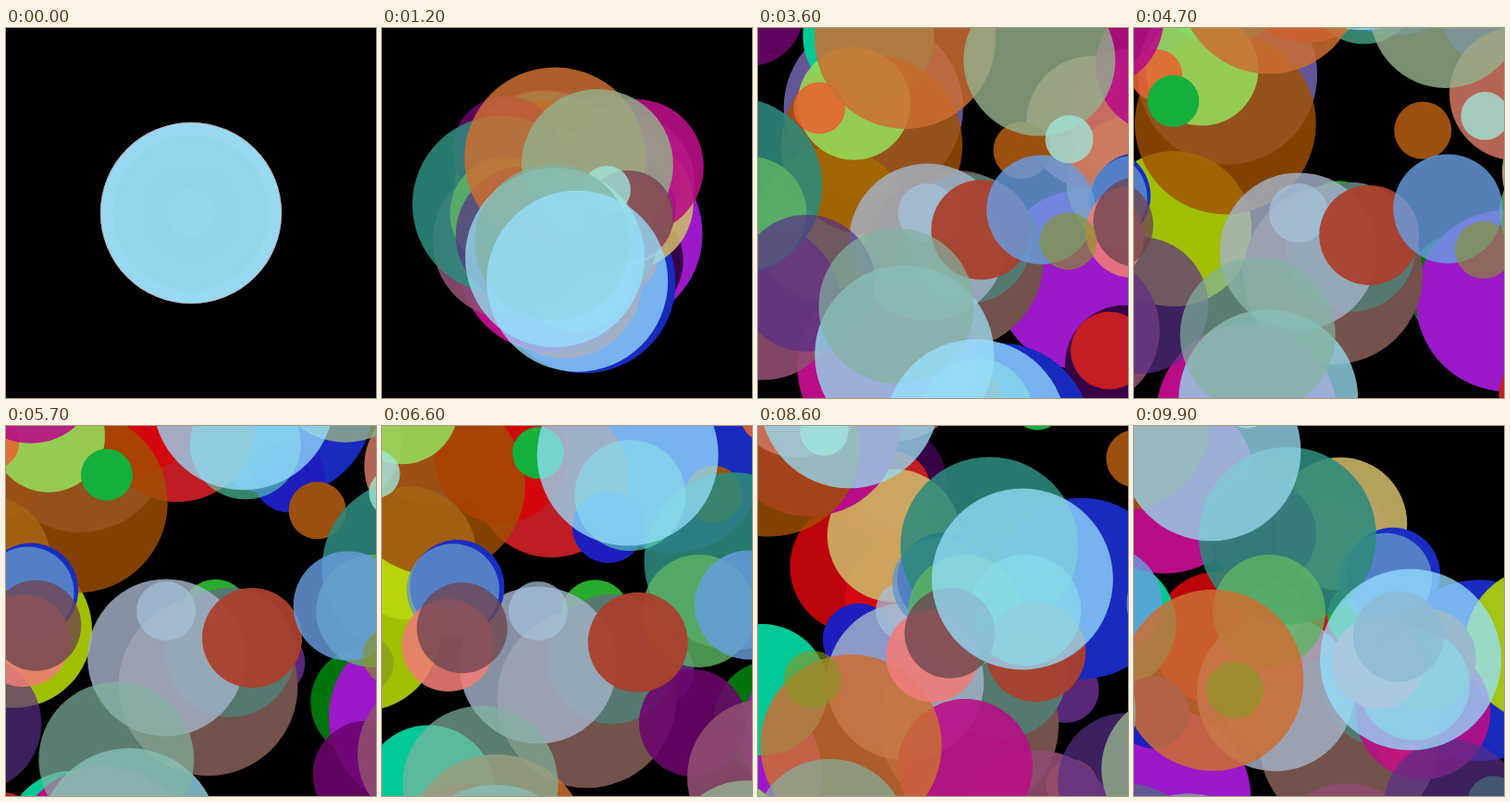
An HTML page with a canvas that plays this animation: 400 px wide and 400 px high, repeating every 10000 ms.

```html
<!DOCTYPE html>
<html lang="en">
<head>
<meta charset="utf-8">
<title>Drifting discs</title>
<style>
  html, body { margin: 0; width: 100%; height: 100%; overflow: hidden; background: #000; }
  canvas { display: block; width: 100vmin; height: 100vmin; }
</style>
</head>
<body>
<canvas id="stage" width="400" height="400"></canvas>
<script>
const ctx = document.getElementById('stage').getContext('2d');
const SIZE = 400, MID = 200;
const STEP = 100, STEPS = 100;
const PAD = 4; // how far beyond the edge a disc goes before it re-enters

// Each disc: radius, velocity x, velocity y (pixels per step), colour.
const back = [
  [36, 1.56, 1, '#5a2878'],
  [60, 3.38, 1.76, '#00730f'],
  [98, 4.41, 2.06, '#9b19c8'],
  [64, 5.6, 4.68, '#370046'],
  [98, 1.76, 6.82, '#192abe'],
  [97, -2.15, -3.25, '#645596'],
  [84, -0.26, 6.68, '#be1e23'],
  [73, 5.92, -3.02, '#8c4b6e'],
  [72, -1.1, 5.93, '#d7050ce0'],
  [42, 5.14, 4.25, '#c31e23'],
  [71, -2.3, -5.47, '#00c896'],
  [72, 5.87, -0.96, '#cdb969e0'],
  [84, -3.41, 0.37, '#b9dc00de'],
  [97, 0.33, 1.45, '#73524b'],
  [98, -1.7, 4.75, '#b90c87'],
  [98, -2.2, -2.1, '#a05000d0'],
  [39, -6.79, 6.08, '#1e1ebe'],
  [72, 4.63, -2.8, '#cd735fe0'],
  [31, 2.44, -1.94, '#9b500f'],
  [37, 0.47, 0.05, '#28aa2d']
];

const middle = [
  [61, -2.75, -3.38, '#96dc5ae0'],
  [28, -3.82, -3.24, '#e66432e0'],
  [28, 6.66, -2.63, '#14af3c'],
  [70, 0.75, 0.8, '#557870'],
  [58, -5.97, -6.2, '#6c056ce0'],
  [84, -5.57, 2.76, '#8e4c70e8'],
  [85, -0.48, 0.9, '#a5b4c8d0'],
  [32, -0.48, 0, '#a5c3dcb8'],
  [51, 6.02, -0.4, '#192dc3'],
  [50, 5.92, -0.35, '#6496c8c8'],
  [96, -6.47, -0.83, '#2d8a7de0'],
  [61, -5.96, 0, '#5fb464d0'],
  [73, 6.8, -4.54, '#b90f87e4'],
  [74, -4.21, 2.17, '#582f87b2'],
  [54, 1.18, 0.52, '#aa412df2'],
  [59, 3.03, -0.1, '#699ee1d0']
];

const front = [
  [60, 1.05, 6.2, '#5adcb499'],
  [98, -1.17, -5.4, '#cd6e32d8'],
  [82, 2.98, -4.72, '#94b08cd0'],
  [50, 5.84, 0.57, '#f07d78e0'],
  [49, 6.04, 0.28, '#6e4650c8'],
  [31, 3.87, 0.87, '#879623a0'],
  [97, -1.19, 4.38, '#96d7ebcc'],
  [26, 3.9, -2.28, '#a0e6dcc8'],
  [84, -1.44, 2.87, '#82b4a0b2'],
  [98, 1.01, 6.7, '#96e1ffc0']
];

const discs = [...back, ...middle, ...front];

// A disc that has fully left comes back in from the opposite edge.
function place(v, r, s) {
  const half = MID + r + PAD, span = 2 * half;
  return MID - half + (((v * s + half) % span) + span) % span;
}

function draw(step) {
  const s = Math.max(0, step - 1);
  ctx.fillStyle = '#000';
  ctx.fillRect(0, 0, SIZE, SIZE);
  for (const [r, vx, vy, color] of discs) {
    ctx.fillStyle = color;
    ctx.beginPath();
    ctx.arc(place(vx, r, s), place(vy, r, s), r, 0, Math.PI * 2);
    ctx.fill();
  }
}

const start = performance.now();
function tick() {
  const t = Math.max(0, performance.now() - start);
  draw(Math.floor(t / STEP) % STEPS);
  requestAnimationFrame(tick);
}
draw(0);
requestAnimationFrame(tick);
</script>
</body>
</html>
```
